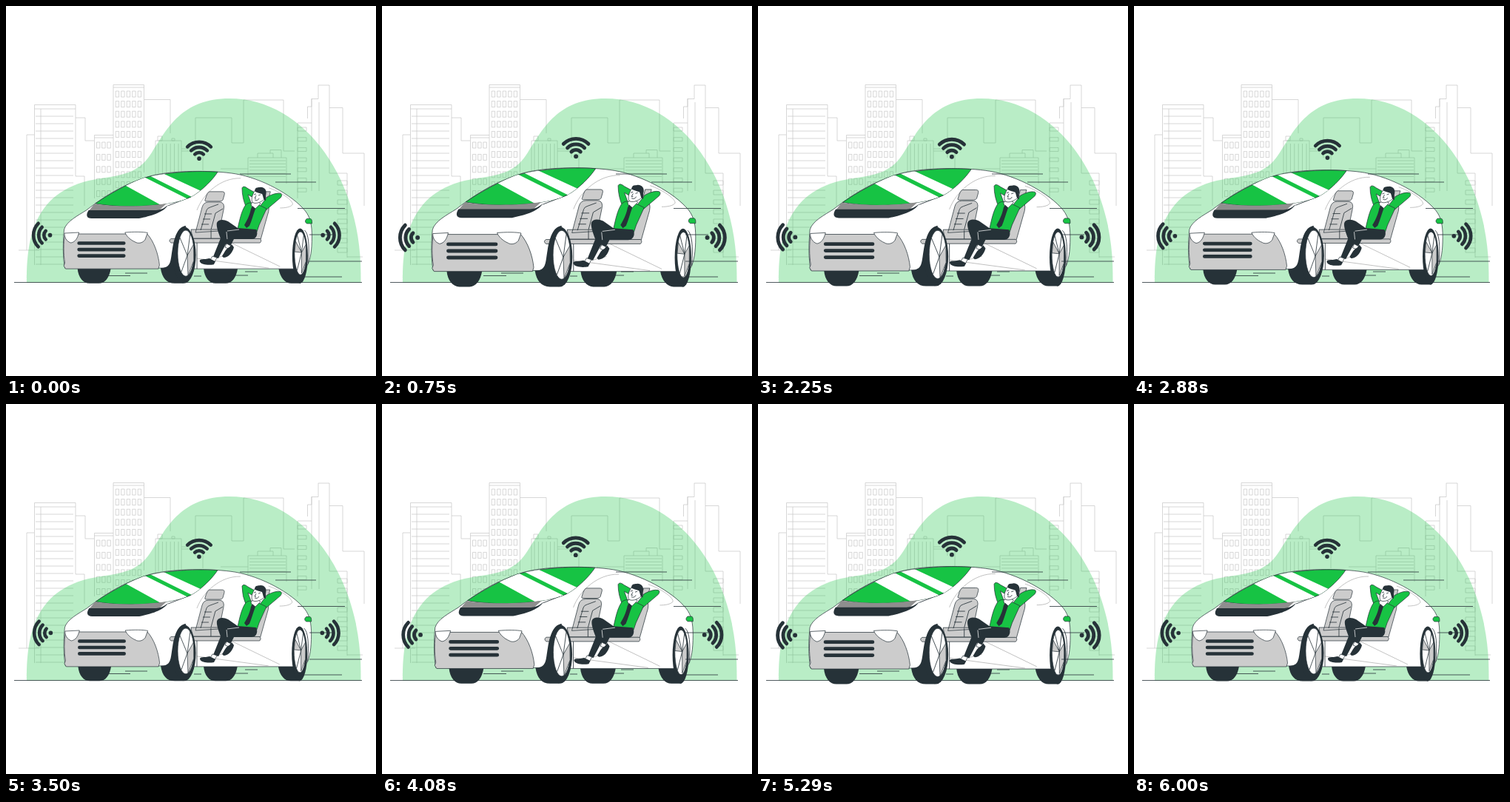
Recreate the animation shown at these times as an HTML page. Size 500 by 500 pixels, loop 6040 ms.

```html
<!DOCTYPE html>
<html lang="en">
<head>
<meta charset="utf-8">
<title>Self-driving car</title>
<style>
html, body { margin: 0; width: 100%; height: 100%; overflow: hidden; background: #fff; }
svg { display: block; width: 100vw; height: 100vh; }
path, ellipse { stroke-linejoin: round; }
.city, .thin { fill: none; stroke: #c6c6c6; stroke-width: .7; }
.thin { stroke: #aaa; }
.ink { fill: none; stroke: #263238; stroke-width: .8; }
.w, .g, .v { stroke: #263238; stroke-width: .7; }
.w { fill: #fff; }
.g { fill: #ccc; }
.v { fill: #17c344; }
.d { fill: #263238; }
.bold { fill: none; stroke: #263238; stroke-width: 4.6; stroke-linecap: round; }
</style>
</head>
<body>
<svg viewBox="0 0 500 500">
  <defs>
    <clipPath id="glass"><path id="pane" d="M121 267C140 254 162 242 185 233C210 226 250 222 286 224.5C280 234 265 250 250 258C225 270 165 275 121 267Z"/></clipPath>
    <g id="wifi">
      <circle class="d" r="2.8"/>
      <path class="bold" d="M-5.8-5.8A8.2 8.2 0 0 1 5.8-5.8M-10.8-10.8A15.3 15.3 0 0 1 10.8-10.8M-15.8-15.8A22.4 22.4 0 0 1 15.8-15.8"/>
    </g>
  </defs>

  <path class="city" id="city"/>
  <path fill="#17c344" opacity=".3" d="M28 374C28 315 36 246 128 233C165 228 182 222 197 198C218 165 238 125 302 125C404 125 484 236 479.5 374Z"/>

  <g id="car">
    <!-- far wheels -->
    <path class="d" d="M97 354C98 367 105 374.5 113 374.5H126C134 374.5 140 367 142 354ZM267 354C268 367 275 374.5 283 374.5H297C305 374.5 311 367 313 354ZM368 354C370 367 377 374.5 385 374.5H398V345Z"/>
    <!-- body -->
    <path class="w" d="M80 354C77 340 77.5 318 79 302C82 291 98 283 109 276C140 252 165 239 195 230C225 222 280 222 310 227C345 233 386 255 404 277C411 286 413 296 413 312C413 330 411 342 407 350L400 355H258L212 354Z"/>
    <path class="thin" d="M258 276C266 254 290 232 317 233M355 246C370 251 387 262 387 268C385 272 376 273 370 273M300 318L370 352M258 341L355 354M281 341L300 336"/>
    <path class="ink" d="M258 319V355M219 270L250 258M403 303Q411 310 408 348"/>
    <use href="#pane" class="v"/>
    <g clip-path="url(#glass)" fill="#fff"><path d="M162 243L186 231L245 260.5L213 271ZM195 230L209 225L263 250L251 258Z"/></g>
    <path fill="#8e8e8e" d="M112 277L120 267.5C150 272 190 271 217 267L206 277Z"/>
    <path class="d" d="M112 276H203C213 275 216 271 219 269C213 279 195 284 180 287H116C109 287 108 282 112 276Z"/>
    <!-- front -->
    <path class="g" d="M80 308H191C200 318 206 335 207.5 350L206 355H81L78.5 351L80 347C78 335 78 320 80 308Z"/>
    <path class="w" d="M79.5 307L99 306C97 314 94 319 88 320C82 318 79 312 79.5 307ZM161 306C172 305 186 305 191.5 306.5L188 316C184 321 178 321 175 319C168 316 163 311 161 306Z"/>
    <path class="bold" d="M99 320.5H159.5M99 329H159.5M99 337.5H159.5"/>
    <!-- seats -->
    <path class="g" d="M269 262Q272 251 275 251H292Q296 251 295 255L293 262Q292 264 289 264H271Q268 264 269 262ZM256 306L265 272Q267 265 274 265H289Q296 266 294 275L288 304ZM250 302H291V314H252Z"/>
    <path class="ink" stroke-width=".5" d="M263 303L271 276Q272 273 276 272L287 268M277 302L283 280L293 274M268 281H278M266 288H276M264 295H274M277 303V314"/>
    <path class="g" d="M328 315L345 270L353 266Q357 272 353 283L344 315ZM349 251H357L355 259H347Z"/>
    <path class="g" d="M223 314.5H343Q346 317 343 320H223Q219 317 223 314.5Z"/>
    <!-- near wheels -->
    <path class="d" d="M208 354C224 354 222 345 225 328C228 310 233 298 243 297L240 374.5H228C217 374.5 211 367 209 354Z"/>
    <ellipse class="d" cx="241" cy="336.5" rx="15.6" ry="38"/>
    <ellipse class="w" cx="243" cy="334" rx="11" ry="31"/>
    <path class="g" stroke-width=".4" d="M245 337L253.5 322L253.8 344L246 364Z"/>
    <path class="ink" stroke-width=".5" d="M235 313L245 337L237 359M245 337L249 307"/>
    <ellipse class="d" cx="397" cy="337.5" rx="10.5" ry="37"/>
    <ellipse class="w" cx="397.5" cy="334" rx="8" ry="29"/>
    <path class="g" stroke-width=".4" d="M399 333L391 318L389.7 332ZM399 333L405 322L405 345L399 361Z"/>
    <path class="ink" stroke-width=".5" d="M393 309L399 333L393 357M399 333L402 309"/>
    <path class="v" d="M406 287.5H411Q413.5 288 413 294H406Q402 291 406 287.5Z"/>
  </g>

  <g id="rider">
    <path class="v" d="M342 272L353 258Q364 252 371 253.5Q374 255 371 259L351 276ZM319 246Q321 242 327 247L336 252L332 258L327 255L331 266L325 273Q319 260 319 246Z"/>
    <path class="v" d="M323 270C327 264 334 266 340 268L352 274L342 296L339 305L313 301C316 288 318 278 323 270Z"/>
    <path class="w" d="M331 267L338 263L344 267L337 274L332 271Z"/>
    <path class="d" d="M333 270L337 274C334 282 332 290 329 297L325 300L322 296C327 288 330 280 331 274Z"/>
    <path class="w" d="M336 250C333 255 330 263 334 266C339 268 347 264 350 260C351 254 345 249 336 250Z"/>
    <path class="d" d="M336 250C337 244 341 246 344 245C350 245 353 250 351 256L351 263C347 262 348 258 346 254C342 253 339 252 337 251Z"/>
    <path class="ink" d="M335 255L338 254M341 256L344 255M338 256L336 260L338 260M336 262Q340 264 342 260"/>
    <path class="d" d="M285 293C287 288 294 288 300 291L313 300L338 302C341 307 339 315 332 315H308L303 325L297 322L287 341L280 339L290 314C287 306 284 298 285 293Z"/>
    <path fill="none" stroke="#fff" stroke-width=".7" d="M299 304L315 302M298 305L299 315"/>
    <path class="w" d="M279 338L285 340L282 346L276 343ZM298 321L304 324L301 328L296 326Z"/>
    <path class="d" d="M262 345C261 341 268 343 275 341L283 345L281 349C275 350 264 350 262 345ZM292 338C296 332 297 328 302 326L305 322L308 326C306 334 300 340 294 340Z"/>
  </g>

  <path class="ink" d="M11 373.5H481M316 227H385M364 238H419M394 273.5H458M410 309H441M410 345H481M400 366H454M161 361H191M137 364.5H168M254 365H264M300 364H327M323 359H340"/>

  <g id="signals">
    <use href="#wifi" transform="translate(261 206.3)"/>
    <use href="#wifi" transform="translate(60 309.5) rotate(-90)"/>
    <use href="#wifi" transform="translate(427.7 309.5) rotate(90)"/>
  </g>
</svg>
<script>
const $ = id => document.getElementById(id);
const box = (x, y, w, h) => `M${x} ${y}h${w}v${h}h${-w}z`;
const repeat = (n, f) => Array.from({ length: n }, (_, i) => f(i)).join('');
const windows = (cols, rows, x, y, dx, dy) =>
  repeat(rows, r => repeat(cols, c => box(x + c * dx, y + r * dy, 4.4, 8)));

$('city').setAttribute('d',
  'M38.5 350V133.5H94V230H106V270M38.5 139H94M47 139V350M38 174H28V330M17 330H45M94 151H107V182H119' +
  repeat(21, i => `M40 ${149 + i * 10}H91`) +
  'M119.5 260V174.5H145M119.5 178H145' + windows(3, 5, 122.5, 184, 7.2, 16.4) +
  'M145 260V106.5H186.5V225M145 110H186.5' + windows(5, 10, 148.2, 115, 7.5, 13.6) +
  'M187 126.5H222V172' +
  'M202 240V182H237V230M237 193H266V222M237 196H255' + box(205, 176, 6, 6) + box(224, 179, 4, 3) +
  repeat(6, i => `M${206 + i * 5.4} 186V226`) +
  'M256 205V151H305V185H321V127H375V196H390M290 220H327' +
  'M327 232V205H379V240M340 205V199H361V205M357 199V194.5H372V205' +
  repeat(6, i => `M329 ${209 + i * 4.3}H378`) +
  'M407.5 152V136H413V125.5H422V107H437V226H461V340M437 137.5H455V199H484V270' +
  'M413 125V250M423 130V250M394 260V158H413M461 339H482' +
  repeat(7, i => box(394, 164 + i * 13.7, 12, 5)) +
  repeat(8, i => box(448, 236 + i * 13, 13, 6)));

const LOOP = 6040;
// Pulse: [time, scale] with straight runs between the turning points
const KEYS = [[-80, .996], [1180, 1.1], [3520, .997], [4760, 1.1], [5960, .996], [7220, 1.1]];

function scaleAt(t) {
  const i = KEYS.findIndex(k => k[0] > t);
  const [t0, a] = KEYS[i - 1], [t1, b] = KEYS[i];
  return a + (b - a) * (t - t0) / (t1 - t0);
}

const zoom = (id, x, y, s) =>
  $(id).setAttribute('transform', `translate(${x} ${y}) scale(${s}) translate(${-x} ${-y})`);

// Each group pulses about its own centre
function draw() {
  const s = scaleAt(performance.now() % LOOP);
  zoom('car', 245.5, 298.5, s);
  zoom('rider', 317.5, 297, s);
  zoom('signals', 243.7, 255, s);
  requestAnimationFrame(draw);
}
draw();
</script>
</body>
</html>
```
